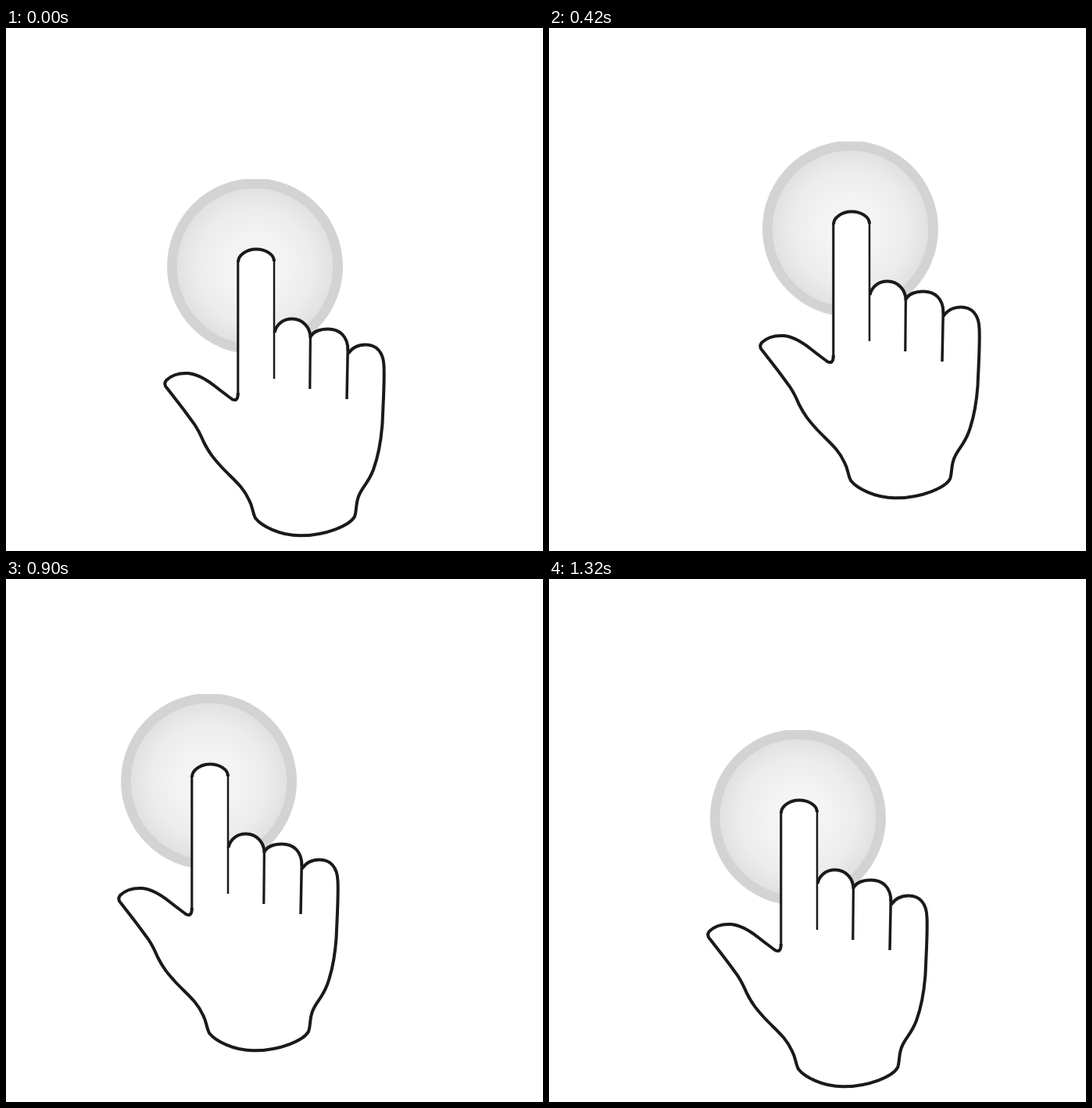
Recreate the animation shown at these times as an HTML page. Size 687 by 668 pixels, loop 1350 ms.

```html
<!DOCTYPE html>
<html lang="en">
<head>
<meta charset="utf-8">
<title>Circling touch</title>
<style>
  html, body { margin: 0; width: 100%; height: 100%; overflow: hidden; background: #fff; }
  svg { display: block; width: 100%; height: 100%; }
</style>
</head>
<body>
<svg viewBox="0 0 687 668" xmlns="http://www.w3.org/2000/svg">
  <defs>
    <radialGradient id="glow">
      <stop offset="0" stop-color="#f6f6f6"/>
      <stop offset=".4" stop-color="#f3f3f3"/>
      <stop offset=".75" stop-color="#ececec"/>
      <stop offset="1" stop-color="#e1e1e1"/>
    </radialGradient>
    <clipPath id="cut"><rect x="200" y="193" width="240" height="222"/></clipPath>
  </defs>
  <g id="touch">
    <g clip-path="url(#cut)">
      <circle cx="318.5" cy="304.5" r="112.5" fill="#d3d3d3"/>
      <circle cx="318.5" cy="304.5" r="99.8" fill="url(#glow)"/>
    </g>
    <path id="skin" fill="#fff"/>
    <g id="lines" fill="none" stroke="#1a1a1c" stroke-linejoin="round"></g>
  </g>
</svg>
<script>
const $ = id => document.getElementById(id);

// Outline pieces, each continuing from its start point
const index = ['297 299', 'C297 290 308 282.5 320 282.5C332 282.5 343 289 343 298'];
const middle = ['343.5 389', 'C346 378 355 371.5 366 371.5C380 371.5 389.5 383 389.5 396'];
const ring = ['389.5 394', 'C394 387 403 384.5 412 384.5C426 384.5 437.5 393 437.5 412'];
const palm = ['437.5 416', `C443 408 452 404.5 460 404.5C474 404.5 483 414 483.5 432
  C484.5 450 482.5 480 481.5 505C480 525 477 545 470 564C464 580 457 585 452 596
  C447 606 449 616 446 624C440 635 410 648.3 376 648.3C350 648.3 327 636 319 626
  C315 618 316 612 311 603C303 585 290 576 276 561C266 550 260 543 253 529
  C248 518 246 512 238 502C226 485 217 474 206 460C203 457 202 454 205 450
  C212 443 223 440.5 233 441C245 442 258 450 268 458C278 466 284 470 289 474
  C293 476 297 476 296.7 466`];

$('skin').setAttribute('d',
  'M' + [index, middle, ring, palm].map(p => p.join('')).join('L') + 'Z');

function stroke(d, width) {
  const p = document.createElementNS('http://www.w3.org/2000/svg', 'path');
  p.setAttribute('d', d);
  p.setAttribute('stroke-width', width);
  $('lines').append(p);
}
for (const p of [index, middle, ring, palm]) stroke('M' + p.join(''), 4);
stroke('M296.8 297V470', 3.1);
stroke('M343 295V448', 2.5);
stroke('M389.4 392L388.8 461', 3.2);
stroke('M437.3 408L436 474', 3.5);

// Straight runs between four corners, moved in whole-pixel steps
const corners = [[0, 0], [86, -34.1], [18, -86.6], [-88, -31.3]];
const LOOP = 1350, STEP = 30, RUN = 11;

function draw(ms) {
  const step = Math.floor((ms % LOOP) / STEP);
  const side = Math.floor(step / RUN);
  const k = (step % RUN) / RUN;
  const a = corners[side % 4], b = corners[(side + 1) % 4];
  const [x, y] = a.map((v, i) => Math.round(v + (b[i] - v) * k));
  $('touch').setAttribute('transform', `translate(${x} ${y})`);
}

let start;
function tick(now) {
  start ??= now;
  draw(now - start);
  requestAnimationFrame(tick);
}
draw(0);
requestAnimationFrame(tick);
</script>
</body>
</html>
```
